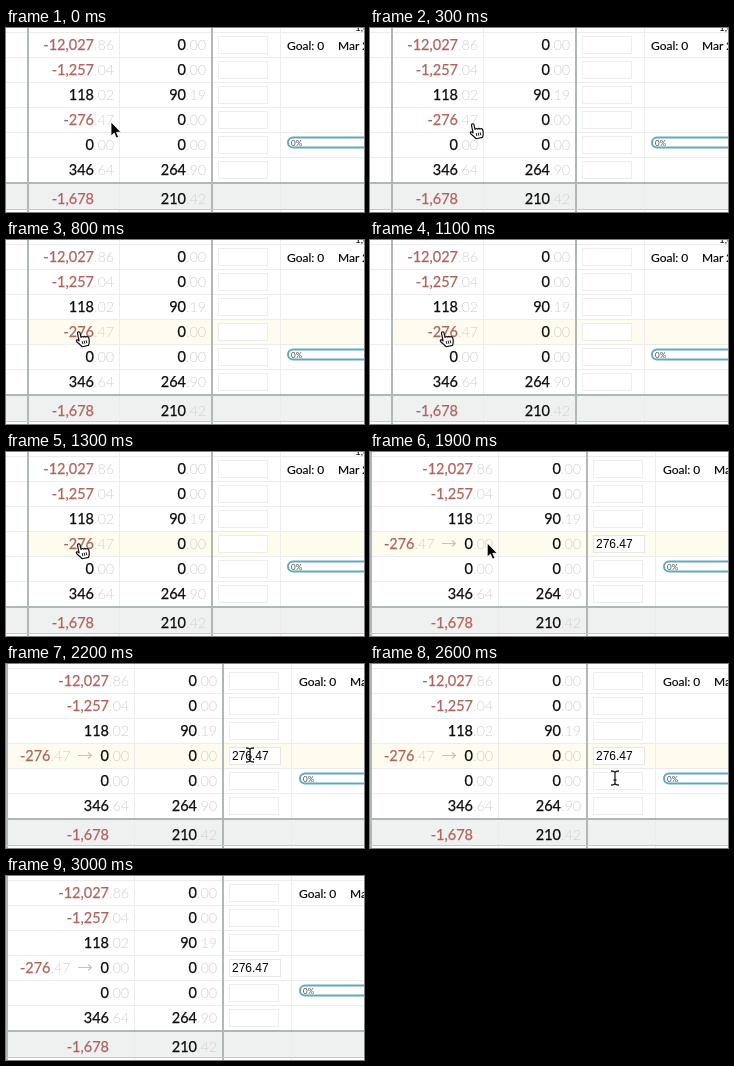
An HTML page for the animation above (3600 ms loop, 358 by 184 pixels).

```html
<!DOCTYPE html>
<html lang="en">
<head>
<meta charset="utf-8">
<title>Budget table</title>
<style>
html, body { margin: 0; width: 100%; height: 100%; overflow: hidden; background: #fff; }
svg { display: block; width: 358px; height: 184px; font-family: Lato, sans-serif; }
.num { font-size: 14.5px; stroke-width: .25; }
.dec { font-size: 14.5px; font-weight: 300; fill: #d0d0d0; }
</style>
</head>
<body>
<svg id="stage" viewBox="0 0 358 184"></svg>
<script>
const stage = document.getElementById('stage');
const LOOP = 3600, STEP = 100, EDIT = 1400;
const RED = '#b2625c', INK = '#0c0c0c', RULE = '#b0b8b7', HAIR = '#ececec';
const rows = [
  ['-12,027.86', '0.00'], ['-1,257.04', '0.00'], ['118.02', '90.19'],
  ['-276.47', '0.00'], ['0.00', '0.00'], ['346.64', '264.90']
];
const totals = ['-1,678', '210.42'];

// Column positions before and after the value is moved into the input.
const before = { left: 22, mid: 113.5, right: 206, edge: 274.5, a: 88, b: 180, input: 212.5, goal: 281 };
const after = { left: 1, mid: 128.5, right: 217, edge: 285.5, a: 103, b: 191, input: 223.5, goal: 293 };

// Pointer path: time, x, y
const path = [
  [0, 105, 94], [100, 105, 95], [300, 105, 95], [600, 75, 91],
  [1800, 75, 91], [2200, 244, 91], [2400, 245, 91], [2600, 245, 114], [2800, 245, 114]
];

const rect = (x, y, w, h, fill, extra = '') =>
  `<rect x="${x}" y="${y}" width="${w}" height="${h}" fill="${fill}" ${extra}/>`;
const text = (x, y, s, extra = '') => `<text x="${x}" y="${y}" ${extra}>${s}</text>`;
const vline = (x, w, color) => rect(x - w / 2, 0, w, 184, color);
const lerp = (a, b, k) => a + (b - a) * k;

function amount(x, y, value) {
  const [whole, cents] = value.split('.');
  const color = whole[0] === '-' ? RED : INK;
  return text(x, y, whole, `class="num" text-anchor="end" fill="${color}" stroke="${color}"`) +
    (cents ? text(x, y, '.' + cents, 'class="dec"') : '');
}

function inputBox(x, y, w, color) {
  return rect(x, y, w, 17, '#fff', `stroke="${color}"`);
}

function table(t) {
  const edited = t >= EDIT, c = edited ? after : before;
  const glow = t < 2800 ? Math.max(0, Math.min(1, (t - 300) / 200)) : Math.max(0, (3000 - t) / 300);
  let s = rect(c.left, 80, 358 - c.left, 25, '#fefcee', `opacity="${glow}"`);
  for (let i = 0; i < 6; i++) s += rect(0, 4 + 25 * i, 358, 1, HAIR);
  s += rect(0, 156, 358, 25, '#eff0f0');
  s += vline(c.mid, 1, HAIR) + vline(c.edge, 1, HAIR);
  s += vline(c.left, 2, RULE) + vline(c.right, 2, RULE);
  s += rect(0, 154, 358, 2, RULE) + rect(0, 181, 358, 1, '#c6c9c9');

  rows.forEach(([a, b], i) => {
    const y = 22.2 + 25 * i, moved = edited && i === 3;
    s += amount(c.a, y, moved ? '0.00' : a) + amount(c.b, y, b);
    s += inputBox(c.input, 8.5 + 25 * i, moved ? 51 : 49, moved ? '#e6e6e6' : '#ededed');
    if (moved) {
      s += amount(44.5, y, a);
      s += '<path d="M72 91.5H85.5M82 88.5L85.5 91.5L82 94.5" fill="none" stroke="#c4c4c4" stroke-width="1.2"/>';
      s += text(226, 96, '276.47', 'font-size="12" font-family="Liberation Sans, sans-serif"');
    }
  });
  s += amount(c.a, 175.7, totals[0]) + amount(c.b, 175.7, totals[1]);

  const label = 'font-size="12" stroke="#000" stroke-width=".15"';
  s += text(c.goal, 22, 'Goal: 0', label) + text(c.goal + 51, 22, 'Mar 2', label);
  s += text(c.goal + 68, 2.5, '1,6', 'font-size="10"');
  s += rect(c.goal + 1, 109.5, 100, 10, '#fff', 'rx="5" stroke="#62a9bd" stroke-width="2"');
  s += text(c.goal + 4, 117.5, '0%', 'font-size="8" fill="#444"');
  return s;
}

const shapes = {
  arrow: '<path d="M0 0V14L3.2 11.1L5.3 16L7.6 15L5.5 10.3H10Z" fill="#000" stroke="#fff" stroke-width=".8"/>',
  hand: '<g transform="translate(-5.3 -.5) rotate(-12 7 9)" fill="#fff" stroke="#111" stroke-width="1.2" stroke-linejoin="round">' +
    '<path d="M3.2 9.5V1.9a1.3 1.3 0 0 1 2.6 0V6.5q1.3-1.2 2.5.3q1.3-.9 2.4.5q1.9-.7 2.5 1.2V11q-.2 2.8-1.8 5H5Q3.5 13.5.9 10.2Q0 8.4 1.3 8.2Q2.4 8.2 3.2 9.5Z"/>' +
    '<path d="M6.2 10.5V13.5M8.2 10.5V13.5M10.2 10.5V13.5" stroke-width=".9"/></g>',
  beam: '<path d="M-4-7Q0-7 0-5Q0-7 4-7M0-5V5M-4 7Q0 7 0 5Q0 7 4 7M-1.5 2H1.5" fill="none" stroke="#222" stroke-width="1.3"/>'
};

function pointer(t) {
  const i = path.findIndex(p => p[0] > t);
  if (i < 0) return '';
  const [t0, x0, y0] = path[i - 1], [t1, x1, y1] = path[i];
  const k = (t - t0) / (t1 - t0), x = lerp(x0, x1, k), y = lerp(y0, y1, k);
  const kind = x > 222 ? 'beam' : t < 100 || x > 108 ? 'arrow' : 'hand';
  return `<g transform="translate(${x} ${y})">${shapes[kind]}</g>`;
}

let last = -1;
function draw() {
  const t = Math.floor(performance.now() % LOOP / STEP) * STEP;
  if (t !== last) stage.innerHTML = table(t) + pointer(t);
  last = t;
  requestAnimationFrame(draw);
}
draw();
</script>
</body>
</html>
```
